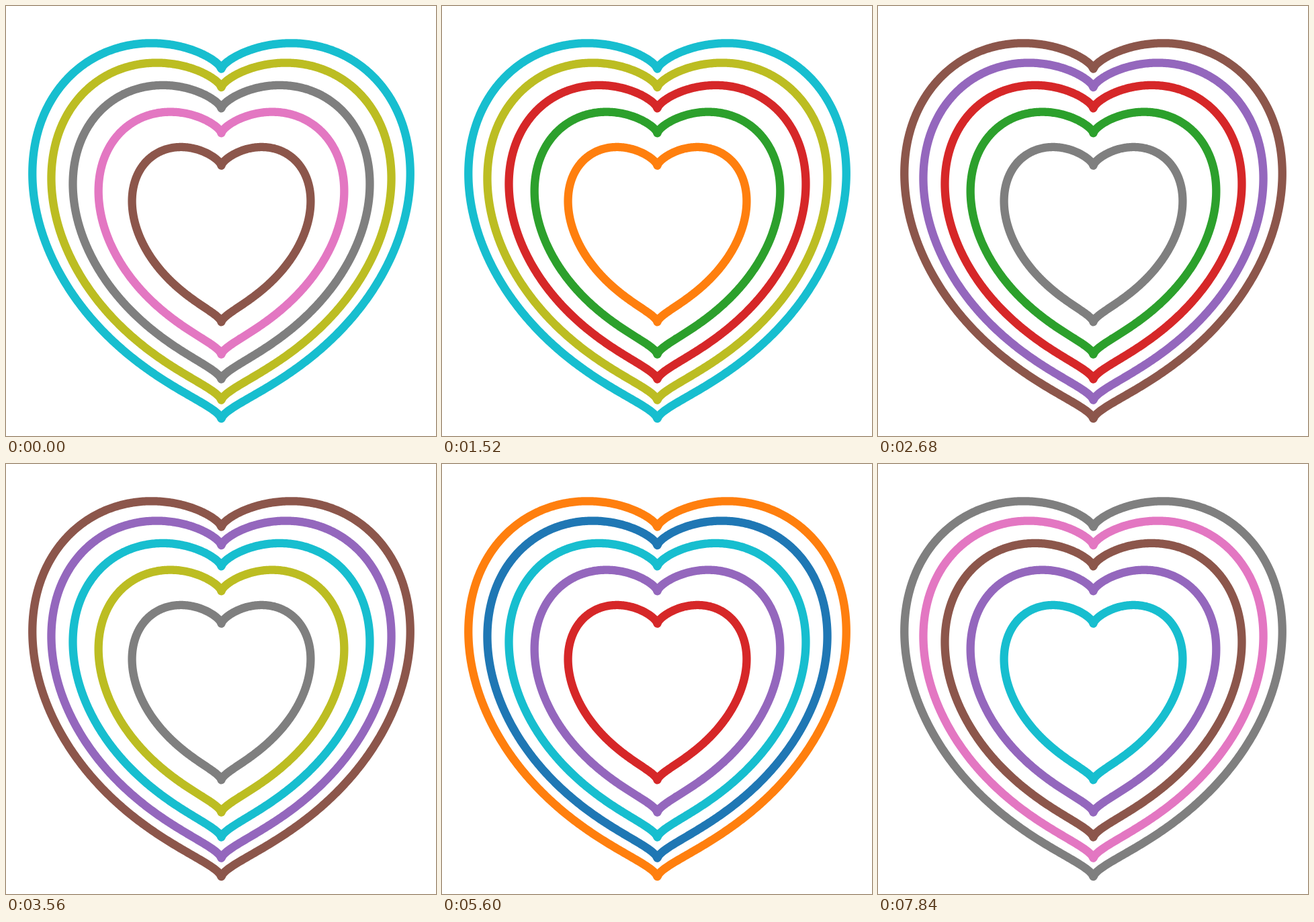
An HTML page with a canvas that plays this animation: 640 px wide and 640 px high, repeating every 8000 ms.

```html
<!DOCTYPE html>
<html lang="en">
<head>
<meta charset="utf-8">
<title>Heart rings</title>
<style>
  html, body { margin: 0; width: 100%; height: 100%; overflow: hidden; background: #fff; }
  canvas { display: block; width: 640px; height: 640px; }
</style>
</head>
<body>
<canvas id="stage" width="640" height="640"></canvas>
<script>
const LOOP = 8000;
const RINGS = 5;
const PALETTE = ['#1f77b4', '#ff7f0e', '#2ca02c', '#d62728', '#9467bd',
                 '#8c564b', '#e377c2', '#7f7f7f', '#bcbd22', '#17becf'];
// Each entry recolours the next ring outward, wrapping back to the innermost.
const CHANGES = [280, 680, 1520, 1600, 2080, 2680, 3080, 3560, 4040, 4560,
                 5080, 5600, 6080, 6600, 7280, 7840];
const CENTER = { x: 320.5, y: 353.9 };
const SCALE = { x: 116.7, y: 116.4 };

const ctx = document.getElementById('stage').getContext('2d');

// Largest x on the curve: x^2 - x^(4/3) / 4 = level.
function halfWidth(level) {
  let x = Math.sqrt(level);
  for (let i = 0; i < 40; i++) x = Math.sqrt(level + Math.pow(x, 4 / 3) / 4);
  return x;
}

// Level curve of x^2 + y^2 - |x|^(2/3) y = level.
function heartPath(level) {
  const path = new Path2D();
  const steps = 720;
  const width = halfWidth(level);
  for (let i = 0; i < steps; i++) {
    const angle = i / steps * 2 * Math.PI;
    const x = width * Math.sin(angle);
    const lift = Math.cbrt(x * x);
    const root = Math.sqrt(Math.max(0, lift * lift - 4 * (x * x - level)));
    const y = (lift + Math.sign(Math.cos(angle)) * root) / 2;
    path.lineTo(CENTER.x + x * SCALE.x, CENTER.y - y * SCALE.y);
  }
  path.closePath();
  return path;
}

const hearts = Array.from({ length: RINGS }, (_, i) => heartPath(i + 1));

// One palette entry is skipped after every full pass over the rings.
function colorOf(change) {
  const index = 1 + change + Math.floor(change / RINGS);
  return PALETTE[(index + PALETTE.length) % PALETTE.length];
}

function draw(time) {
  const done = CHANGES.filter(t => t <= time).length;
  ctx.fillStyle = '#fff';
  ctx.fillRect(0, 0, 640, 640);
  ctx.lineWidth = 12.3;
  ctx.lineJoin = 'round';
  for (let change = done - RINGS; change < done; change++) {
    ctx.strokeStyle = colorOf(change);
    ctx.stroke(hearts[(change + RINGS) % RINGS]);
  }
}

const start = performance.now();
function tick() {
  draw((performance.now() - start) % LOOP);
  requestAnimationFrame(tick);
}
tick();
</script>
</body>
</html>
```
